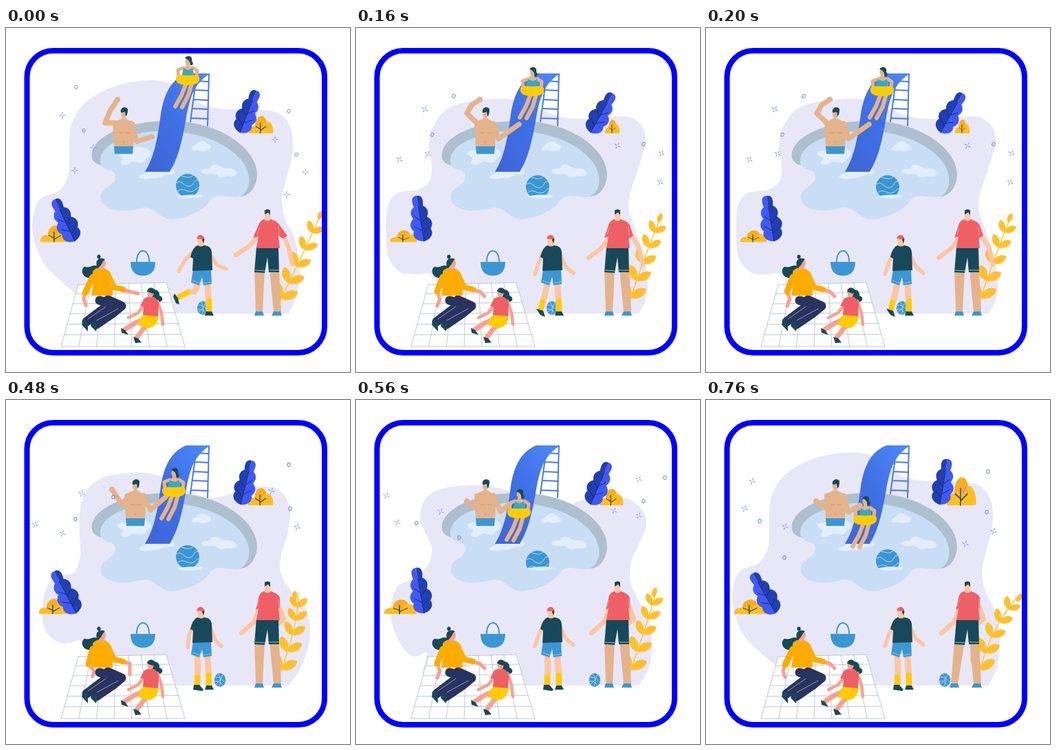
An HTML page for the animation above (0.8 s loop, 500 by 500 pixels).

```html
<!DOCTYPE html>
<html lang="en">
<head>
<meta charset="utf-8">
<title>Pool day</title>
<style>
html, body { margin: 0; width: 100%; height: 100%; overflow: hidden; background: #fff; }
svg { display: block; width: 100vw; height: 100vh; }
</style>
</head>
<body>
<svg id="stage" viewBox="0 0 500 500"></svg>
<script>
const TAN = '#e4b38b', PEACH = '#fdc6a1', PINK = '#fb9f90', DARK = '#17495a', BLUE = '#3b97d3',
  RED = '#ef5f66', YELLOW = '#ffcc00', ORANGE = '#ffab00', NAVY = '#28335f', LILAC = '#e8e7f8', FOAM = '#e2eef9';

const fill = (d, color) => `<path d="${d}" fill="${color}"/>`;
const line = (d, color, width = 1) =>
  `<path d="${d}" fill="none" stroke="${color}" stroke-width="${width}" stroke-linecap="round" stroke-linejoin="round"/>`;
const limb = (points, width, color) => line('M' + points, color, width);
const oval = (x, y, rx, ry, color) => `<ellipse cx="${x}" cy="${y}" rx="${rx}" ry="${ry}" fill="${color}"/>`;
const group = (transform, ...parts) => `<g transform="${transform}">${parts.join('')}</g>`;
const pairs = text => text.split(' ').map(p => p.split(',').map(Number));

// Smooth curve through points (Catmull-Rom as cubic segments).
function spline(points) {
  let d = 'M' + points[0];
  for (let i = 0; i < points.length - 1; i++) {
    const [a, b, c, e] = [-1, 0, 1, 2].map(k => points[Math.min(points.length - 1, Math.max(0, i + k))]);
    d += `C${b[0] + (c[0] - a[0]) / 6},${b[1] + (c[1] - a[1]) / 6} ${c[0] - (e[0] - b[0]) / 6},${c[1] - (e[1] - b[1]) / 6} ${c}`;
  }
  return d;
}

const wideBlob = '110,392 98,383 80,368 55,342 41,308 39,275 50,248 78,236 91,210 92,165 97,135 118,106 160,84 210,76 245,83 270,104 310,117 360,118 398,125 415,150 416,185 407,220 401,250 406,278 419,305 427,345 424,385 411,415';
const calm = { boyArms: ['273,325 266,340 260,358', '297,330 305,347 316,356'], womanArm: '126,362 118,383', womanHand: '118,383 122,394 118,404', reach: '187,390' };

// One entry per held pose; "until" is the end of the hold in ms.
const poses = [
  { until: 160, blob: wideBlob,
    circles: '102,86 113,149 411,121 422,184', sparks: '82,127 127,174 100,207 391,162 435,209 408,242', spin: 0,
    rider: '264,75', swimmer: 0, armUp: '160,138 144,138 151,121 162,104', armOut: '182,139 190,165 212,158',
    float: 229, ball: '286,407', rightLeaf: [340, 364, 92], rightBush: [353, 388, 25], leftLeaf: [100, 71, 250], leftBush: [50, 92, 24],
    frond: [424, 345, 459, 268],
    boyArms: ['273,325 261,336 251,353', '297,330 307,345 320,350'], kick: '279,372 274,383 264,384',
    womanArm: '126,362 115,385', womanHand: '115,385 113,394 116,403', reach: '192,386',
    dad: { left: '366,304 352,318 334,330', right: '403,300 411,320 416,343', sleeves: [359, 409], foot: 368 } },
  { ...calm, until: 360,
    blob: '120,372 106,357 90,358 65,355 48,335 44,300 46,260 60,240 90,235 107,222 110,200 106,172 111,146 132,118 170,106 220,103 255,112 300,130 350,131 395,129 417,145 420,170 410,205 400,235 396,262 405,290 418,330 424,370 421,395 411,415',
    circles: '142,99 111,155 418,169', sparks: '100,118 63,191 104,183 380,171 444,182 442,224', spin: 30,
    rider: '256,91', swimmer: 17, armUp: '178,140 161,124 168,112 180,104', armOut: '200,139 207,161 237,140',
    float: 231, ball: '285,407', rightLeaf: [341, 373, 96], rightBush: [362, 383, 20], leftLeaf: [99, 88, 245], leftBush: [50, 88, 17],
    frond: [418, 335, 444, 272], step: '278,372 274,390 269,409',
    dad: { left: '368,304 357,320 338,334', right: '399,300 411,318 417,344', sleeves: [361, 403], foot: 368 } },
  { ...calm, until: 560,
    blob: '120,372 110,350 85,354 65,345 54,325 54,290 65,262 85,254 100,250 108,225 107,195 107,165 115,135 140,113 180,106 215,108 250,122 290,142 325,137 350,128 380,126 402,135 413,160 409,195 400,225 399,250 412,275 430,293 441,320 440,355 428,390 411,415',
    circles: '101,173 156,141 411,94 413,158', sparks: '110,136 42,181 82,194 386,132 423,185', spin: 20,
    rider: '244,133', swimmer: 17, armUp: '178,140 169,152 162,142 154,130', armOut: '200,139 210,160 232,141',
    float: 228, ball: '311,407', rightLeaf: [341, 357, 89], rightBush: [352, 388, 25], leftLeaf: [102, 70, 250], leftBush: [48, 90, 22],
    frond: [425, 330, 425, 281], womanArm: '126,362 120,384', womanHand: '120,384 128,394 126,402', reach: '180,399',
    boyArms: ['273,325 266,342 264,360', '297,330 304,349 313,358'],
    dad: { left: '369,302 360,323 342,339', right: '396,298 404,318 396,325', sleeves: [363, 398], foot: 368 } },
  { ...calm, until: 760,
    blob: '106,415 97,398 103,368 85,373 68,360 54,330 51,300 60,272 85,258 105,240 110,215 100,192 93,172 100,145 125,129 175,124 215,130 245,146 290,160 320,148 350,143 385,141 412,155 422,180 412,208 400,235 399,265 410,290 423,315 430,345 427,385 411,415',
    circles: '88,179 150,200 449,113 418,147', sparks: '44,139 60,178 123,162 411,115 375,161 411,168', spin: 25,
    rider: '237,164', swimmer: 17, armUp: '178,140 175,158 161,147', armOut: '200,139 210,162 223,152',
    float: 236, ball: '347,407', rightLeaf: [341, 367, 92], rightBush: [354, 388, 24], leftLeaf: [99, 87, 245], leftBush: [41, 88, 21],
    frond: [422, 330, 437, 276],
    dad: { left: '369,302 360,323 342,339', right: '396,298 404,318 396,325', sleeves: [363, 398], foot: 368 } },
  { ...calm, until: 800, blob: wideBlob,
    circles: '78,176 114,229 410,104 408,163', sparks: '67,118 56,158 115,184 376,131 418,191 377,209', spin: 20,
    rider: '231,174', swimmer: 17, armUp: '178,140 175,158 160,147', armOut: '200,139 207,163 224,153',
    float: 234, ball: '347,407', rightLeaf: [340, 351, 87], rightBush: [350, 392, 41], leftLeaf: [101, 68, 253], leftBush: [41, 87, 21],
    frond: [410, 335, 456, 282], womanArm: '126,362 115,385', womanHand: '115,385 112,394 115,403',
    dad: { left: '369,302 360,323 342,339', right: '396,298 404,318 396,325', sleeves: [363, 398], foot: 361 } },
];

function decorations(p) {
  const rings = pairs(p.circles).map(([x, y]) =>
    `<ellipse cx="${x}" cy="${y}" rx="2.2" ry="2.6" fill="none" stroke="#7d8af0" transform="rotate(${p.spin} ${x} ${y})"/>`);
  const sparks = pairs(p.sparks).map(([x, y]) =>
    group(`translate(${x} ${y}) rotate(${p.spin})`, line('M-4.5,0H-1.5M1.5,0H4.5M0,-4.5V-1.5M0,1.5V4.5', '#8490f0')));
  return rings.join('') + sparks.join('');
}

function plant([baseX, tipX, tipY], [x0, x1, height], y, side) {
  const dx = tipX - baseX, dy = y - tipY;
  const angle = Math.atan2(dx, dy) * 180 / Math.PI, size = Math.hypot(dx, dy) / 60;
  const half = 'C9,-1 15,-8 11,-15 C16,-20 15,-27 9,-31 C13,-37 11,-43 6,-46 C8,-54 7,-59 2,-60 L0,-60';
  return group(`translate(${x0} ${y}) scale(${(x1 - x0) / 38} ${height / 25})`,
      fill('M0,0C-1,-9 6,-12 10,-10C10,-27 25,-29 28,-17C36,-18 40,-6 38,0Z', '#ffbe20'),
      fill('M10,-10C10,-27 25,-29 28,-17C23,-16 23,-11 20,-8C18,-13 14,-13 10,-10Z', '#f9ad1f'),
      line('M18,0V-15M18,-6L11,-10M18,-4L27,-10', '#123557', 1.1)) +
    group(`translate(${baseX} ${y - 1}) rotate(${angle}) scale(${size * side} ${size})`,
      fill(`M0,0${half}L0,0`, '#4159f1'),
      group('scale(-1 1)', fill(`M0,0${half}L0,0`, '#213fb0')),
      line('M0,0V-46M0,-14L9,-21M0,-27L7,-34M0,-10L-9,-17M0,-24L-8,-30', '#152b78', .8));
}

function frond([cx, cy, tx, ty]) {
  const [bx, by] = [396, 402];
  const leaf = (x, y, angle, size) => group(`translate(${x} ${y}) rotate(${angle}) scale(${size})`,
    fill('M0,0C.25,-.34 .8,-.36 1,0C.8,.3 .3,.3 0,0Z', '#ffc02d'));
  let out = line(`M${bx},${by}Q${cx},${cy} ${tx},${ty}`, '#ffc02d', 1.3);
  for (const t of [.07, .26, .45, .63, .8]) {
    const u = 1 - t, size = 27 - 10 * t;
    const x = u * u * bx + 2 * u * t * cx + t * t * tx, y = u * u * by + 2 * u * t * cy + t * t * ty;
    const angle = Math.atan2(u * (cy - by) + t * (ty - cy), u * (cx - bx) + t * (tx - cx)) * 180 / Math.PI;
    out += leaf(x, y, angle - 40, size) + leaf(x, y, angle + 42, size);
  }
  return out + leaf(tx - 5, ty + 11, Math.atan2(ty - cy, tx - cx) * 180 / Math.PI, 15);
}

function pool() {
  return fill('M125,188C121,160 172,134 240,135C312,136 365,176 365,213C364,234 352,245 340,245L140,200C131,198 126,194 125,188Z', '#aebfcf') +
    fill('M137,195C135,174 165,155 215,150C270,146 320,165 342,192C360,215 355,238 340,245C322,249 305,236 295,253C285,268 255,278 240,278C220,276 215,256 195,262C175,268 145,268 138,250C134,230 160,232 159,215C158,203 139,210 137,195Z', '#c9def5') +
    fill('M162,181C168,176 174,180 179,175C192,170 207,174 211,181C212,188 203,188 202,194C194,199 187,191 181,196C173,202 162,198 169,192C174,187 160,187 162,181Z', FOAM) +
    fill('M270,174C272,170 276,172 278,167C285,163 291,166 293,169C301,171 299,178 291,178C285,181 281,176 276,178C271,179 269,177 270,174Z', FOAM) +
    fill('M284,208C288,202 298,207 298,201C306,195 311,203 319,204C327,203 336,206 335,212C332,219 322,213 316,217C309,219 306,210 299,212C292,213 285,212 284,208Z', FOAM) +
    fill('M193,217C196,211 203,213 207,208L240,204C249,208 244,214 238,213C229,212 225,219 214,218C207,220 196,220 193,217Z', FOAM);
}

function slide() {
  const rungs = [77, 90, 104, 117, 131].map((y, i) => `M${277 - i * 1.9},${y}L294,${y + 1}`).join('');
  return line(`M295,67L293,142M276,77L268,136${rungs}`, '#4a7be9', 2) +
    fill('M262,66H297C276,79 268,96 262,130C256,165 250,190 238,209H202C214,190 220,165 225,125C230,95 240,75 262,66Z', 'url(#slide)');
}

function rider(at) {
  return group(`translate(${at})`,
    limb('-2,5 -9,23 -18,39', 6, TAN), limb('6,5 1,23 -8,40', 6, TAN),
    fill('M-6,-18L-2,-20V-25H3V-20L8,-18L9,-4H-8Z', TAN),
    limb('-6,-17 -14,-14 -13,-4', 5, TAN), limb('8,-17 14,-13 13,-4', 5, TAN),
    fill('M-6,-17Q1,-11 7,-17L10,-3H-9Z', '#3aa9c0'),
    fill('M-17,-3C-15,-8 -10,-6 0,-6C10,-6 15,-8 17,-3C18,4 13,8 0,8C-13,8 -18,4 -17,-3Z', YELLOW),
    oval(0, -27, 3.5, 4.5, TAN),
    fill('M-4,-31C0,-37 8,-34 6,-27C9,-24 8,-20 4,-21C3,-25 3,-29 -4,-31Z', DARK));
}

function swimmer(p) {
  return group(`translate(${p.swimmer} 0)`,
      fill('M157,172L155,137Q164,134 169,131H174Q178,135 187,137L185,173Z', TAN),
      fill('M157,172H185L184,183H158Z', BLUE),
      oval(171, 125, 4, 6, TAN),
      fill('M167,123C165,115 175,113 177,118C177,123 176,128 174,128L173,122Z', DARK),
      line('M164,152q3,2 6,0M174,152q3,2 6,0M171,165v2', '#c08b68', .7)) +
    limb(p.armUp, 7.5, TAN) + limb(p.armOut, 7.5, TAN) +
    oval(...p.armUp.split(' ').pop().split(',').map(Number), 4, 4, TAN);
}

function beachBall(y) {
  return `<clipPath id="surface"><path d="M240,200H290V244H240Z"/></clipPath><g clip-path="url(#surface)">` +
    oval(264, y, 17, 17, BLUE) +
    group(`translate(264 ${y})`, line('M-16,-4C-8,-10 -5,3 3,1S8,-9 15,-8M-14,8C-6,1 0,12 8,8S12,2 17,3M-9,-14C-2,-12 4,-10 8,-15', '#c9def5', .9)) +
    '</g>' + fill('M249,245Q263,241 286,243Q287,247 276,247Q258,249 249,245Z', FOAM);
}

function mat() {
  let d = '';
  for (let i = 0; i <= 7; i++) d += `M${105 + i * 128 / 7},${373 - i * 3 / 7}L${80 + i * 180 / 7},463`;
  for (const t of [0, .15, .31, .47, .64, .81, 1])
    d += `M${105 - 25 * t},${373 + 90 * t}L${233 + 27 * t},${370 + 93 * t}`;
  return fill('M105,373L233,370L260,463H80Z', '#fff') + line(d, '#b5c5ce', .9);
}

function woman(p) {
  return fill('M134,346C124,343 124,349 114,347C107,352 112,364 122,363C132,363 136,356 140,349Z', DARK) +
    limb(p.womanHand, 5, PINK) +
    limb(`168,380 180,383 ${p.reach}`, 5, PINK) +
    limb('136,396 153,401 138,411 117,427', 13, NAVY) + limb('148,395 168,404 156,414 131,431', 13, NAVY) +
    line('M132,425L163,408M119,423L145,405', '#dfe4f2', .6) +
    fill('M113,422L119,428L119,441L110,431Z', DARK) + fill('M125,426L133,431L131,441L123,433Z', DARK) +
    fill('M126,354C130,348 136,348 142,349C152,352 155,360 155,370V389H124L126,372Z', ORANGE) +
    limb(p.womanArm, 9, ORANGE) + limb('149,360 157,377 170,380', 8, ORANGE) +
    line('M127,372L124,388M151,368L154,376', '#ffd77d', .7) +
    fill('M134,342H143L142,350Q138,353 135,349Z', PINK) + oval(140, 342, 5, 6.5, PINK) +
    oval(135, 332.5, 2.6, 3, DARK) + fill('M133,349C128,338 135,332 144,336C139,340 140,345 133,349Z', DARK);
}

function girl() {
  return fill('M209,382C219,377 224,384 223,389C230,391 228,399 221,398C214,398 213,390 209,386Z', DARK) +
    limb('220,397 226,414 228,431', 4.5, PINK) + limb('203,400 192,414 178,421', 4.5, PINK) +
    limb('199,424 187,429 173,438', 7, PINK) + limb('208,429 199,438 190,450', 7, PINK) +
    fill('M167,436L173,439L178,446L168,443Z', DARK) + fill('M185,449L192,451L197,457L188,458Z', DARK) +
    fill('M200,416L222,418C222,429 214,436 207,436L192,432Q192,423 200,416Z', YELLOW) +
    fill('M201,393Q208,389 215,391Q222,395 222,402L221,419L199,417L200,405L195,404Z', RED) +
    oval(210, 386, 4.5, 5.5, PINK) + fill('M205,383C206,375 217,376 217,384L213,386Z', DARK);
}

function boy(p) {
  const front = p.kick
    ? limb(p.kick, 9, PEACH) + limb('263,385 251,391', 8, YELLOW) + fill('M245,386L250,393L252,402L247,400L243,390Z', DARK)
    : p.step
      ? limb(p.step, 9, PEACH) + limb('271,398 268,409', 7, YELLOW) + fill('M262,408L272,411L275,420L268,417Z', DARK)
      : limb('278,372 279,390 278,412', 9, PEACH) + limb('278,403 278,413', 8, YELLOW) + fill('M273,414H281L287,421L285,423L272,421Z', DARK);
  const drop = p.kick || p.step ? 0 : 3;
  return p.boyArms.map(a => limb(a, 5.5, PEACH)).join('') + front +
    limb(`293,372 294,390 295,${410 + drop}`, 9, PEACH) + limb(`295,${397 + drop} 295,${410 + drop}`, 8, YELLOW) +
    fill(`M291,${412 + drop}H299L302,${418 + drop}H289Z`, DARK) +
    fill('M272,351H298L299,372L287,374L285,362L281,374L269,370Z', BLUE) + line('M271,367L282,371M288,371L298,369', '#b8d9f0', .7) +
    fill('M278,316H289Q298,317 299,325L300,352L271,353L272,335L268,333Q271,319 278,316Z', DARK) +
    fill('M279,307H288V316Q283,319 279,316Z', PEACH) + oval(283, 308, 5, 6, PEACH) +
    fill('M286,303Q290,305 287,313L285,308Z', DARK) +
    fill('M277,306C279,299 287,299 288,306L284,307Z', RED);
}

function dad({ left, right, sleeves: [l, r], foot }) {
  return limb(left, 6.5, PEACH) + limb(right, 6.5, PEACH) +
    fill(`M361,350L376,351L${foot + 5},413H${foot - 5}Z`, TAN) + fill('M383,351H397L400,413H389Z', TAN) +
    fill(`M${foot - 5},412H${foot + 5}L${foot + 7},418H${foot - 7}Z`, BLUE) + fill('M389,412H399L401,418H386Z', BLUE) +
    fill('M364,318H396L397,355H382L380,333L376,356L361,355Z', DARK) +
    line('M362,352L376,353M383,352L397,352', '#d4e1e2', .7) +
    fill(`M375,278H385Q395,281 398,287L${r},302L${r - 7},306L396,302L398,320H364L367,303L${l},305L368,284Q371,279 375,278Z`, RED) +
    line('M368,291L365,300M396,290L397,302', '#f9b2b5', .7) +
    fill('M376,272H384V279Q380,282 376,279Z', PEACH) + oval(380, 271, 4, 5.5, PEACH) +
    fill('M376,271V265Q380,262 384,265V272L381,268Z', DARK);
}

const kickBall = at => group(`translate(${at})`, oval(0, 0, 8.2, 10, BLUE),
  line('M-7,-4Q-1,-6 7,3M-8,2Q0,0 4,8M-3,-9Q4,-2 -1,9M4,-8Q2,0 -6,6', '#c5ddf0', .8));

const bag = fill('M181,340H217C217,353 211,360 199,360C187,360 181,353 181,340Z', BLUE) +
  line('M190,339C190,319 208,319 208,339', BLUE, 2);

const defs = `<defs><linearGradient id="slide" x1="1" y1="0" x2="0" y2="1">
  <stop stop-color="#4e89fa"/><stop offset=".5" stop-color="#3f70e5"/><stop offset="1" stop-color="#3f65d6"/></linearGradient></defs>`;
const border = '<rect x="30.5" y="33" width="432.5" height="439" rx="38" fill="none" stroke="#00f" stroke-width="8"/>';

const scene = p => defs + fill(spline(pairs(p.blob)) + 'H112Z', LILAC) +
  pool() + slide() + beachBall(p.float) + swimmer(p) + rider(p.rider) +
  plant(p.rightLeaf, p.rightBush, 153, 1) + plant(p.leftLeaf, p.leftBush, 311, -1) + decorations(p) +
  bag + mat() + woman(p) + girl() + frond(p.frond) +
  kickBall(p.ball) + boy(p) + dad(p.dad) + border;

const stage = document.getElementById('stage');
const start = performance.now();
let shown;
function draw() {
  const time = (performance.now() - start) % 800;
  const pose = poses.find(p => time < p.until);
  if (pose !== shown) stage.innerHTML = scene(shown = pose);
  requestAnimationFrame(draw);
}
draw();
</script>
</body>
</html>
```
